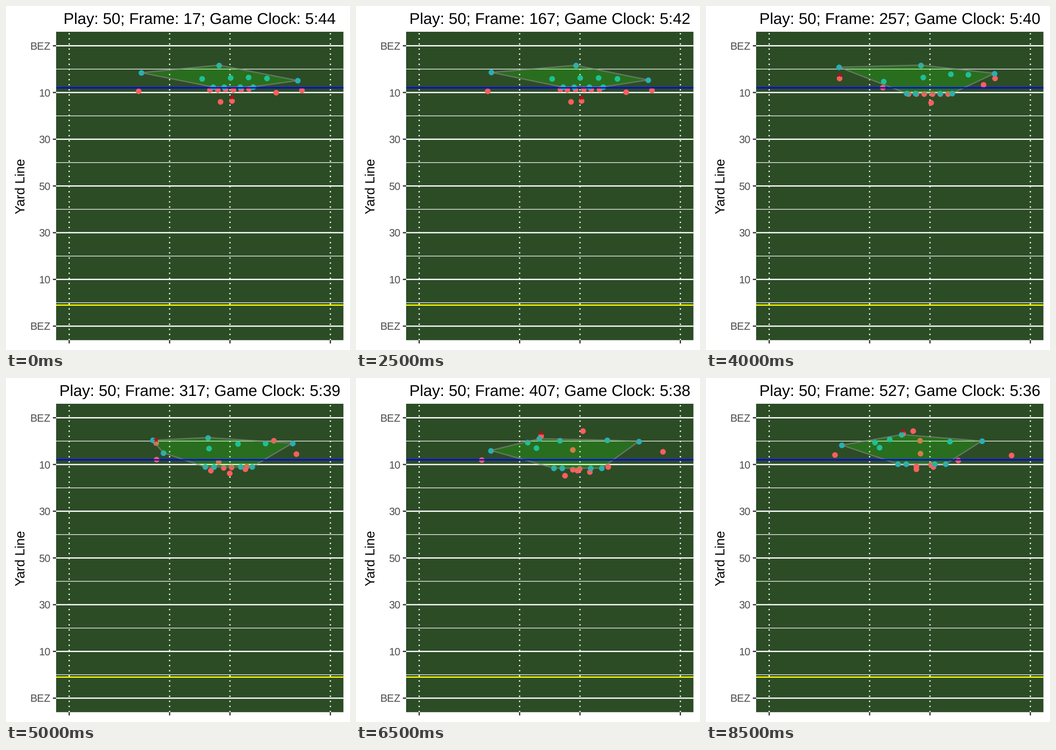
A matplotlib script for the animation above (9000 ms loop, 748 by 748 pixels).

```python
import numpy as np
import matplotlib.pyplot as plt
from matplotlib.animation import FuncAnimation
from matplotlib.patches import Polygon, Rectangle

SIZE, DPI = 748, 100
FRAMES, INTERVAL = 18, 500
PT = 72 / DPI  # points per pixel

FIELD, RED, CYAN = "#2c4c26", "#fb5f5c", "#1cb4bd"
LEFT, RIGHT, TOP, BOTTOM = 109, 733.7, 56, 726.6
YARD = (BOTTOM - TOP) / 132  # 120 yards plus 5 % padding at both ends
BASE = 28.6                  # base font size in pixels
THICK, THIN = 2.77 * PT, 1.38 * PT

# Players hold their stance up to the snap at step 5, then run their route
KEYS = np.array([0, 5, 8, 13, 17])
rng = np.random.default_rng(50)

plt.rcParams["font.family"] = "Liberation Sans"
plt.rcParams["text.hinting"] = "none"


def smooth(pts):
    """Monotone cubic through the points at KEYS, sampled at every step."""
    pts = np.array(pts, float)
    h = np.diff(KEYS)[:, None]
    slope = np.diff(pts, axis=0) / h
    a, b = slope[:-1], slope[1:]
    same = a * b > 0
    inner = np.where(same, 2 * a * b / np.where(same, a + b, 1), 0)
    m = np.vstack([slope[:1], inner, slope[-1:]])
    t = np.arange(FRAMES)
    k = np.clip(np.searchsorted(KEYS, t, side="right") - 1, 0, len(KEYS) - 2)
    hk = h[k]
    u = (t - KEYS[k])[:, None] / hk
    return ((1 + 2 * u) * (1 - u) ** 2 * pts[k] + u * (1 - u) ** 2 * hk * m[k]
            + u * u * (3 - 2 * u) * pts[k + 1] + u * u * (u - 1) * hk * m[k + 1])


def run(stance, *route, drift=(0, 0)):
    """Small shuffles around the stance, then three route points."""
    stance = np.array(stance, float)
    path = smooth([stance, stance + drift, *route])
    path[:KEYS[1] + 1] += rng.normal(0, 0.6, (KEYS[1] + 1, 2))
    return path


def block(spot, *route):
    """Offensive lineman: gives a little ground, then blocks."""
    x = 443 + 17.2 * spot
    return run((x, 181.3), (x - 3, 191), *route)


def rush(x, x_deep):
    """Defensive lineman: pushes in, then turns back after the ball."""
    return run((x, 176), (x + 0.7 * (x_deep - x), 190), (x_deep, 196), (x_deep - 13, 187))


def hull(points):
    """Convex hull by monotone chain."""
    pts = sorted(map(tuple, points))

    def chain(seq):
        out = []
        for p in seq:
            while len(out) > 1:
                (ax, ay), (bx, by) = out[-2:]
                if (bx - ax) * (p[1] - ay) - (by - ay) * (p[0] - ax) > 0:
                    break
                out.pop()
            out.append(p)
        return out[:-1]

    return chain(pts) + chain(pts[::-1])


passer = run((491, 206), (489.5, 209.5), (481, 200.5), (489, 188))
catcher = run((288, 185), (290, 156.5), (402, 126), (428, 121))
offense = np.array([
    passer,
    catcher,
    run((643, 183), (628, 156.5), (493, 115), (450, 115)),
    run((587, 186.5), (603, 170.5), (667, 160), (664, 167.5)),
    run((467, 208), (384, 176.5), (273, 178), (280.5, 166.5)),
    block(0, (454.5, 211.5), (457, 198)),
    block(1, (471, 156), (465, 135.5)),
    block(2, (471, 198.5), (457, 192)),
    block(3, (486.5, 196.5), (466, 164)),
    block(4, (548, 193), (548, 178.5)),
    block(5, (508.5, 204), (494.5, 193)),
])
defense = np.array([
    run((293.5, 145), (289, 133), (373.5, 139.5), (367.5, 140)),
    run((463, 127.5), (467, 128.5), (398, 132), (399, 133), drift=(15, 1)),
    run((634, 161.5), (627.5, 146.5), (615.5, 137.5), (600, 137)),
    run((426, 158), (386, 164), (293, 157.5), (295.5, 146)),
    run((487, 156.5), (472, 154.5), (392, 152), (377, 151)),
    run((527, 155.5), (532.5, 147.5), (443, 135.5), (425.5, 123)),
    run((567, 157), (570.5, 149), (546, 135), (530.5, 138)),
    rush(450, 430), rush(473, 448), rush(508, 510), rush(537.5, 534),
])

# The ball sits just ahead of whoever holds it; the pass flies from step 6 to 8
flight = np.clip((np.arange(FRAMES) - 6) / 2, 0, 1)[:, None]
ball = passer + (catcher - passer) * flight - (0, 7.3)

fig = plt.figure(figsize=(SIZE / DPI, SIZE / DPI), dpi=DPI, facecolor="white")
ax = fig.add_axes([0, 0, 1, 1])
ax.set_xlim(0, SIZE)
ax.set_ylim(SIZE, 0)
ax.axis("off")


def line(x0, y0, x1, y1, color, width=THICK, z=1, **kw):
    ax.plot([x0, x1], [y0, y1], color=color, lw=width, zorder=z, snap=False,
            solid_capstyle="butt", dash_capstyle="butt", **kw)


def across(yards, color, width=THICK, z=1):
    y = TOP + (6 + yards) * YARD
    line(LEFT, y, RIGHT, y, color, width, z)
    return y


def label(x, y, text, size, **kw):
    return ax.text(x, y, text, size=size * PT, va="baseline", **kw)


def dots(color, z):
    return ax.plot([], [], "o", ms=12.3 * PT, mfc=color, mew=0, zorder=z)[0]


ax.add_patch(Rectangle((LEFT, TOP), RIGHT - LEFT, BOTTOM - TOP,
                       fc=FIELD, lw=0, zorder=0, snap=False))
for yards in range(10, 120, 20):
    across(yards, "white", THIN)
for i, name in enumerate(["BEZ", "10", "30", "50", "30", "10", "BEZ"]):
    y = across(20 * i, "white")
    line(LEFT - 7.1, y, LEFT, y, "#333333")
    label(96.8, y + 8.2, name, 0.8 * BASE, color="#4d4d4d", ha="right")
for x in (137.4, 355.8, 487, 705.3):
    line(x, BOTTOM, x, TOP, "white", linestyle=(0, (1, 3)))
    line(x, BOTTOM, x, BOTTOM + 7.1, "#333333")
across(18, "#0000ff", z=6)
across(111, "#ffff00", z=6)

label(41, 391.3, "Yard Line", BASE, color="black", rotation=90,
      rotation_mode="anchor", ha="center")
title = label(421.3, 39.3, "", 1.2 * BASE, color="black", ha="center")

red_dots, cyan_dots = dots(RED, 2), dots(CYAN, 3)
zone = Polygon([(0, 0)] * 3, closed=True, fc=(0.12, 0.98, 0, 0.2),
               ec=(0.53, 0.53, 0.53, 0.62), lw=THICK, joinstyle="round", zorder=4)
ax.add_patch(zone)
star = ax.plot([], [], marker=(5, 2, 0), ms=10.5 * PT, mec="#a3161c",
               mew=2 * PT, zorder=5)[0]


def draw(i):
    title.set_text(f"Play: 50; Frame: {17 + 30 * i}; Game Clock: 5:{44 - i // 2}")
    red_dots.set_data(*offense[:, i].T)
    cyan_dots.set_data(*defense[:, i].T)
    zone.set_xy(hull(defense[:, i]))
    star.set_data(ball[i, :1], ball[i, 1:])
    return title, red_dots, cyan_dots, zone, star


anim = FuncAnimation(fig, draw, frames=FRAMES, interval=INTERVAL, repeat=True,
                     repeat_delay=0, init_func=lambda: draw(0), blit=False)
plt.show()
```
